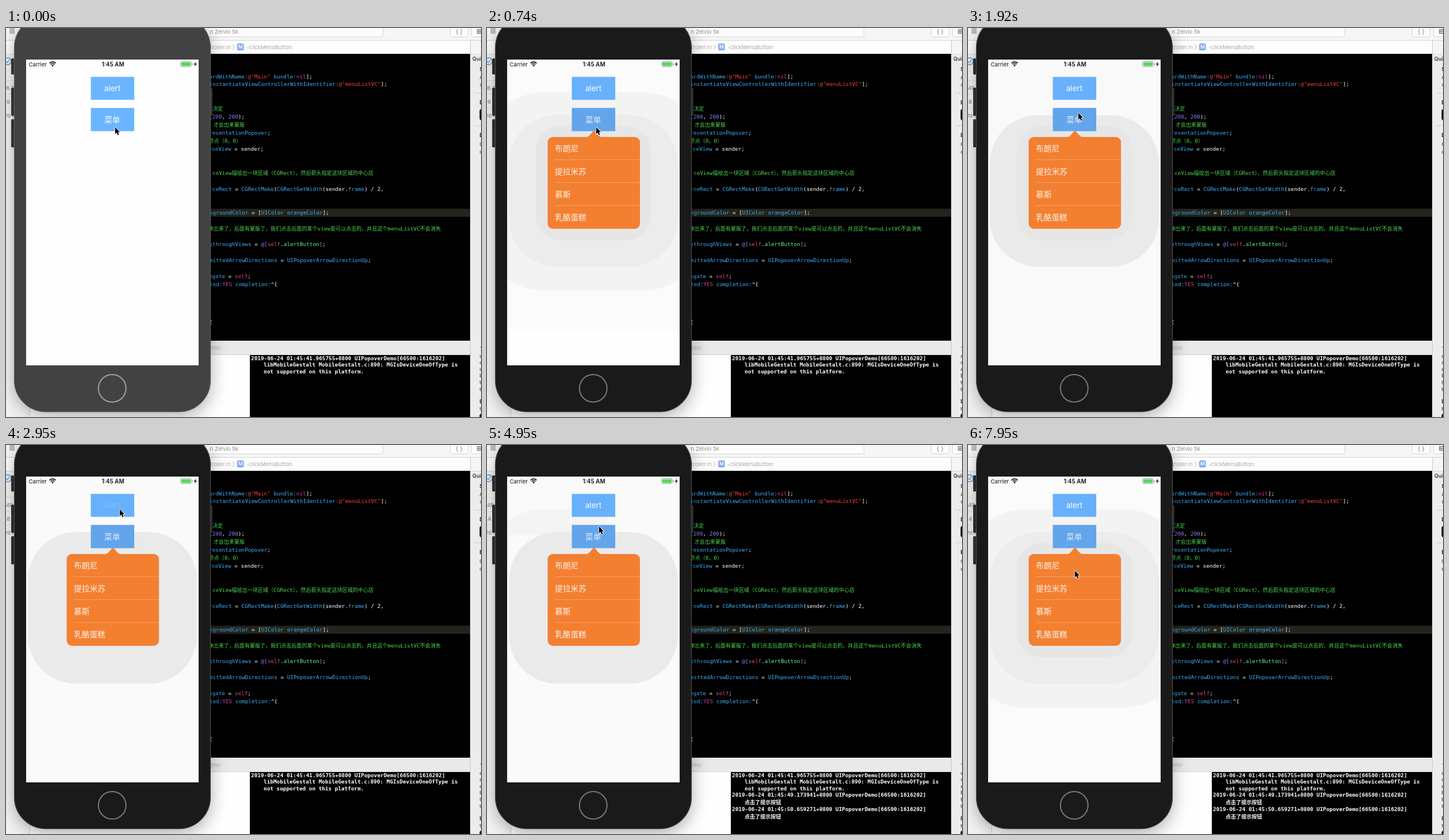
Recreate the animation shown at these times as an HTML page with a canvas. Size 826x678 px, loop 8 s.

```html
<!DOCTYPE html>
<html lang="zh-CN">
<head>
<meta charset="utf-8">
<title>Popover demo</title>
<style>
html, body { margin: 0; width: 100%; height: 100%; overflow: hidden; background: #fff; }
canvas { display: block; }
</style>
</head>
<body>
<canvas id="stage" width="826" height="678"></canvas>
<script>
const ctx = document.getElementById('stage').getContext('2d');
const LOOP = 8000;
const UI = 'Inter, "Noto Sans CJK SC", "Noto Sans CJK", sans-serif';
const MONO = '"DejaVu Sans Mono", monospace';
const HAN = '"Noto Sans CJK SC", "Noto Sans CJK", sans-serif';

const INK = { w: '#ffffff', b: '#3fb0fb', r: '#f8423f', k: '#d6409f', n: '#8d80ff', g: '#50d852', m: '#5df59a' };

// Each line: centre y, right edge, then colour and text pairs.
const CODE = [
  [85, 533, 'b', 'ardWithName:', 'r', '@"Main"', 'b', ' bundle:', 'k', 'nil', 'w', '];'],
  [98, 663, 'b', 'instantiateViewControllerWithIdentifier:', 'r', '@"menuListVC"', 'w', '];'],
  [141, 377, 'g', '决定'],
  [155, 415, 'w', '(', 'n', '200', 'w', ', ', 'n', '200', 'w', ');'],
  [169, 415, 'g', '才会出来蒙版'],
  [183, 460, 'b', 'resentationPopover', 'w', ';'],
  [197, 409, 'g', '原点（0，0）'],
  [211, 448, 'b', 'rceView', 'w', ' = sender;'],
  [253, 639, 'g', 'ceView描绘出一块区域（CGRect），然后箭头指定这块区域的中心店'],
  [281, 657, 'b', 'rceRect', 'w', ' = ', 'b', 'CGRectMake', 'w', '(', 'b', 'CGRectGetWidth', 'w', '(sender.', 'b', 'frame', 'w', ') / 2,'],
  [322, 562, 'b', 'kgroundColor', 'w', ' = [', 'b', 'UIColor orangeColor', 'w', '];'],
  [350, 756, 'g', '弹出来了，后面有蒙版了，我们点击后面的某个view是可以点击的，并且这个menuListVC不会消失'],
  [377, 556, 'b', 'sthroughViews', 'w', ' = ', 'n', '@[', 'k', 'self', 'w', '.', 'm', 'alertButton', 'n', ']', 'w', ';'],
  [405, 635, 'b', 'mittedArrowDirections', 'w', ' = ', 'b', 'UIPopoverArrowDirectionUp', 'w', ';'],
  [433, 426, 'b', 'egate', 'w', ' = ', 'k', 'self', 'w', ';'],
  [447, 472, 'b', 'ted:', 'k', 'YES', 'b', ' completion:', 'w', '^{'],
  [513, 359, 'w', '{']
];

// Console: time of appearance, x, centre y, text.
const LOG = [
  [0, 426, 575.5, '2019-06-24 01:45:41.965755+0800 UIPopoverDemo[66500:1616202]'],
  [0, 448, 587, 'libMobileGestalt MobileGestalt.c:890: MGIsDeviceOneOfType is'],
  [0, 448, 598.5, 'not supported on this platform.'],
  [3160, 426, 610, '2019-06-24 01:45:49.173941+0800 UIPopoverDemo[66500:1616202]'],
  [3160, 448, 622.5, '点击了提示按钮'],
  [4660, 426, 635, '2019-06-24 01:45:50.659271+0800 UIPopoverDemo[66500:1616202]'],
  [4660, 448, 647.5, '点击了提示按钮']
];

const CURSOR = [
  [0, 189, 172], [1190, 190, 162], [1490, 190, 161], [1640, 191, 156], [1770, 191, 151],
  [1920, 191, 147], [2070, 194, 136], [2210, 197, 124], [2360, 197, 115], [2510, 197, 111],
  [4800, 195, 129], [4950, 194, 141], [5850, 194, 160], [6000, 193, 185], [6150, 193, 206],
  [6600, 194, 203], [6750, 194, 200], [7950, 185, 218]
];
const GAUGE = [[0, '6'], [1490, '8'], [4800, '4']];
const MEMORY = [[0, '8.2'], [1190, '49']];
const SHADE = [[0, 'none'], [740, 'rising'], [890, 'full'], [1040, 'soft'], [2950, 'flat'], [4950, 'partial'], [5100, 'full']];
const ALERT_ALPHA = [[0, 1], [2950, 0.2], [3160, 0.6], [3310, 1], [4510, 0.2], [4660, 0.6], [4800, 1]];

const at = (keys, t) => keys.filter(k => k[0] <= t).pop();

function rect(x, y, w, h, color) {
  ctx.fillStyle = color;
  ctx.fillRect(x, y, w, h);
}

function round(x, y, w, h, r, fill, stroke, width = 1) {
  ctx.beginPath();
  ctx.roundRect(x, y, w, h, r);
  if (fill) { ctx.fillStyle = fill; ctx.fill(); }
  if (stroke) { ctx.strokeStyle = stroke; ctx.lineWidth = width; ctx.stroke(); }
}

function line(points, color, width = 1) {
  ctx.beginPath();
  points.forEach(([x, y]) => ctx.lineTo(x, y));
  ctx.strokeStyle = color;
  ctx.lineWidth = width;
  ctx.stroke();
}

function poly(points, color) {
  ctx.beginPath();
  points.forEach(([x, y]) => ctx.lineTo(x, y));
  ctx.closePath();
  ctx.fillStyle = color;
  ctx.fill();
}

function label(text, x, y, size, color, align = 'left', weight = 400) {
  ctx.font = `${weight} ${size}px ${UI}`;
  ctx.textAlign = align;
  ctx.fillStyle = color;
  ctx.fillText(text, x, y);
}

// Splits a coloured line into Latin and Han runs and measures each.
function runs(parts, weight) {
  const out = [];
  for (let i = 0; i < parts.length; i += 2) {
    for (const text of parts[i + 1].match(/[\u2e80-\uffef]+|[^\u2e80-\uffef]+/g)) {
      const han = text.charCodeAt(0) >= 0x2e80;
      const font = han ? `${weight} 9.06px ${HAN}` : `${weight} 9.35px ${MONO}`;
      ctx.font = font;
      out.push({ text, font, color: INK[parts[i]], w: ctx.measureText(text).width });
    }
  }
  return out;
}

function mono(parts, x, y, weight, fromRight) {
  const list = runs(parts, weight);
  if (fromRight) x -= list.reduce((sum, r) => sum + r.w, 0);
  ctx.textAlign = 'left';
  for (const r of list) {
    ctx.font = r.font;
    ctx.fillStyle = r.color;
    ctx.fillText(r.text, x, y + 3.2);
    x += r.w;
  }
}

function toolbar() {
  rect(0, 0, 826, 22, '#f6f6f6');
  round(100, -10, 555.5, 25.5, 3, '#fdfdfd', '#d4d4d4');
  label('n Zelvio 5k', 404, 10, 9.6, '#8d8d8d', 'right');
  round(772.5, -8, 31, 23.5, 3, '#fdfdfd', '#d4d4d4');
  label('{ }', 788, 10, 10.5, '#808080', 'center');
  round(809.5, -8, 31, 23.5, 3, '#fdfdfd', '#d4d4d4');
  rect(819, 2, 7, 8, '#8a8a8a');
  rect(820, 4, 6, 1, '#fdfdfd');
  rect(820, 7, 6, 1, '#fdfdfd');
  rect(6, 0, 9, 10, '#bcbcbc');
  rect(0, 21, 826, 1, '#d2d2d2');

  rect(0, 22, 807, 23, '#fefefe');
  label('troller.m', 391, 37, 9.3, '#b0b0b0', 'right');
  line([[394, 29], [397, 33.5], [394, 38]], '#b4b4b4');
  round(402, 27, 11.5, 12, 2.5, '#7ba6f4');
  label('M', 407.8, 36.4, 8.5, '#fff', 'center', 600);
  label('-clickMenuButton:', 418, 37, 9.4, '#a6a6a6');
}

function inspector() {
  rect(807, 22, 19, 656, '#ececec');
  rect(807, 22, 19, 23, '#f5f5f5');
  rect(807, 22, 1, 656, '#c8c8c8');
  rect(808, 45, 18, 1, '#dadada');
  label('Quick', 811, 57, 9, '#3a3a3a', 'left', 600);
  const tips = [[75, 'S'], [133, 'D'], [190, 'D'], [654, 'L']];
  tips.forEach(([y, s]) => label(s, 823.5, y, 9, '#222', 'left', 700));
  const notes = [[89, 'A'], [102, 's'], [206, 'C'], [219, 'c'], [559, '-'], [575, 'c'], [586, 'c'], [598, 'd'], [609, 'b'], [621, 't'], [633, 't'], [667, 't']];
  notes.forEach(([y, s]) => label(s, 823.5, y, 9, '#333'));
  rect(815, 113, 11, 1, '#cfcfcf');
  rect(815, 170, 11, 1, '#cfcfcf');
  round(823.5, 141, 20, 20, 4, '#111');
  round(823.5, 672, 20, 20, 4, '#111');
}

function editor(t) {
  rect(340, 45, 467, 500, '#000');
  rect(340, 315, 467, 14, '#23241b');
  CODE.forEach(([y, end, ...parts]) => mono(parts, end, y, 400, true));

  rect(340, 545, 467, 25, '#e9e9e9');
  rect(340, 569, 467, 1, '#d5d5d5');
  label('emo', 373, 560.5, 9.6, '#b0b0b0', 'right');
  rect(340, 570, 84, 108, '#fefefe');
  rect(424, 570, 383, 108, '#000');
  LOG.forEach(([start, x, y, text]) => {
    if (t >= start) mono(['w', text], x, y, 700);
  });
}

function navigator(t) {
  rect(0, 45, 41, 633, '#f3f3f3');
  rect(41, 600, 1, 78, '#d0d0d0');
  rect(5, 29, 12, 9, '#c2c2c2');
  rect(6, 30, 10, 7, '#fefefe');
  rect(0, 45, 20, 1, '#dadada');
  rect(0, 91, 14, 1, '#e2e2e2');
  ctx.beginPath();
  ctx.arc(3, 58, 6, 0, 7);
  ctx.strokeStyle = '#4a90ea';
  ctx.lineWidth = 1.3;
  ctx.stroke();
  line([[0, 58], [2.5, 60.5], [6, 55.5]], '#4a90ea', 1.2);
  label(at(MEMORY, t)[1], 0, 107.5, 9.4, '#777');
  label(at(GAUGE, t)[1], 1, 131.5, 9.4, '#777');
  label('ro r', -1, 155.5, 9.4, '#777');
  rect(0, 115, 14, 1, '#e2e2e2');
  rect(0, 139, 14, 1, '#e2e2e2');
}

function phoneBody(lit) {
  const body = lit ? '#424242' : '#1a1a1a';
  const keys = lit ? '#333' : '#2b2b2b';
  ctx.save();
  ctx.shadowColor = 'rgba(0,0,0,.32)';
  ctx.shadowBlur = 30;
  ctx.shadowOffsetY = 8;
  round(14.5, -21, 341, 690, 55, body);
  ctx.restore();
  [[53, 28], [104, 49], [159, 49]].forEach(([y, h]) => round(9, y, 5.5, h, 1.5, keys));
  round(355.5, 105, 3.5, 48, 1.5, keys);
  round(14.5, -21, 341, 690, 55, body, lit ? '#5c5c5c' : '#4a4a4a', 1.2);
  ctx.beginPath();
  ctx.arc(184.7, 628, 24, 0, 7);
  ctx.strokeStyle = lit ? '#a0a0a0' : '#777';
  ctx.lineWidth = 2;
  ctx.stroke();
}

function halo(mode) {
  if (mode === 'none') return;
  const strong = mode === 'rising' || mode === 'full';
  rect(35, 55, 300, mode === 'rising' ? 473 : 533, strong ? '#fbfbfb' : mode === 'soft' ? '#f9f9f9' : '#fafafa');
  if (strong) round(-15, 112, 400, 346, 115, '#f3f3f3');
  if (mode === 'partial') {
    ctx.save();
    ctx.beginPath();
    ctx.rect(35, 109, 173, 48);
    ctx.clip();
    round(-15, 112, 400, 346, 115, '#f4f4f4');
    ctx.restore();
  }
  round(38, 152, 294, 264, 84, strong ? '#ececec' : '#eaeaea');
  if (strong || mode === 'soft') round(85, 171, 200, 199, 42, '#e6e6e6');
}

function statusBar() {
  label('Carrier', 39.5, 66.5, 9.6, '#111');
  ctx.lineCap = 'butt';
  [[7.6, 1.7], [4.7, 1.7]].forEach(([r, w]) => {
    ctx.beginPath();
    ctx.arc(81, 66.8, r, -Math.PI * 0.75, -Math.PI * 0.25);
    ctx.strokeStyle = '#111';
    ctx.lineWidth = w;
    ctx.stroke();
  });
  poly([[81, 67.2], [79, 65], [81, 64], [83, 65]], '#111');
  label('1:45 AM', 186, 66.7, 10, '#111', 'center', 600);
  round(303.5, 58.5, 19, 9, 2.5, null, '#a5a5a5', 0.9);
  round(304.8, 59.8, 16.4, 6.4, 1.4, '#59d662');
  round(323.6, 61.2, 1.4, 3.6, 0.7, '#a5a5a5');
  poly([[330, 58.5], [326.8, 63.7], [329, 63.7], [328, 67.6], [331.8, 62.2], [329.5, 62.2]], '#111');
}

function popover() {
  const orange = '#f37f31';
  round(105.5, 190, 160.5, 160, 9, orange);
  ctx.beginPath();
  ctx.moveTo(172, 190.5);
  ctx.quadraticCurveTo(176, 190, 179, 186.5);
  ctx.lineTo(183.5, 181);
  ctx.quadraticCurveTo(186, 178.5, 188.5, 181);
  ctx.lineTo(193, 186.5);
  ctx.quadraticCurveTo(196, 190, 200, 190.5);
  ctx.fillStyle = orange;
  ctx.fill();
  ['布朗尼', '提拉米苏', '慕斯', '乳酪蛋糕'].forEach((name, i) => {
    ctx.font = `400 13.7px ${HAN}`;
    ctx.textAlign = 'left';
    ctx.fillStyle = '#fff3e8';
    ctx.fillText(name, 118, 214.6 + i * 40);
    if (i) rect(118, 189 + i * 40, 148, 1, '#f8a265');
  });
}

function screen(t) {
  const open = t >= 740;
  ctx.save();
  ctx.beginPath();
  ctx.rect(35, 55, 300, 533);
  ctx.clip();
  rect(35, 55, 300, 533, '#fefefe');
  halo(at(SHADE, t)[1]);
  statusBar();
  rect(147.5, 85.2, 75.5, 40, open ? '#67b0fb' : '#6bb5ff');
  rect(147.5, 139.3, 75.5, 40.5, open ? '#62a5ea' : '#6bb5ff');
  ctx.globalAlpha = at(ALERT_ALPHA, t)[1];
  label('alert', 185, 110, 13.5, '#fff', 'center');
  ctx.globalAlpha = open ? 0.8 : t >= 530 ? 0.2 : 1;
  ctx.font = `400 13.7px ${HAN}`;
  ctx.textAlign = 'center';
  ctx.fillStyle = '#fff';
  ctx.fillText('菜单', 184.8, 164.6);
  ctx.globalAlpha = 1;
  if (open) popover();
  ctx.restore();
}

function pointer(t) {
  const [, x, y] = at(CURSOR, t);
  ctx.save();
  ctx.translate(x + 0.8, y + 0.8);
  const arrow = [[0, 0], [0, 12], [2.7, 9.5], [4.7, 14], [6.7, 13.1], [4.7, 8.8], [8.3, 8.6]];
  ctx.lineJoin = 'round';
  line([...arrow, arrow[0]], '#fff', 1.8);
  poly(arrow, '#000');
  ctx.restore();
}

function draw(t) {
  rect(0, 0, 826, 678, '#fefefe');
  navigator(t);
  toolbar();
  editor(t);
  inspector();
  phoneBody(t < 530);
  screen(t);
  pointer(t);
}

const begin = performance.now();
function frame() {
  draw((performance.now() - begin) % LOOP);
  requestAnimationFrame(frame);
}
frame();
</script>
</body>
</html>
```
